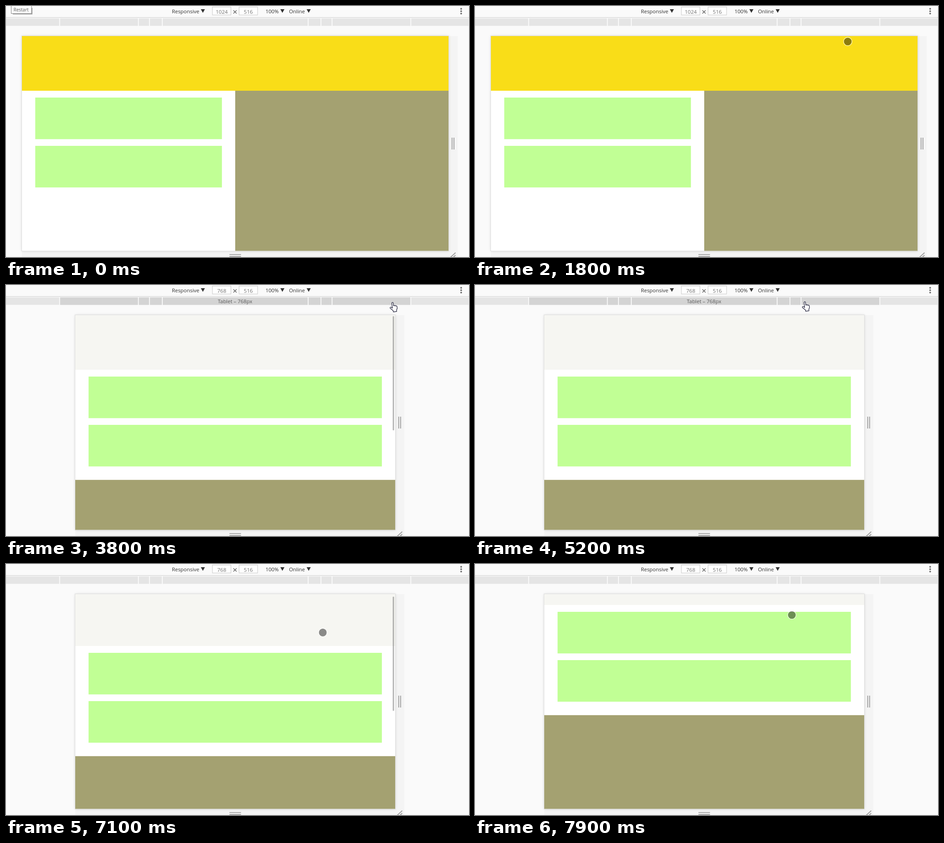
Animation of 1016 by 551 pixels, one loop 8000 ms. Source, as an HTML page:

```html
<!DOCTYPE html>
<html lang="en">
<head>
<meta charset="utf-8">
<title>Responsive preview</title>
<style>
html, body { margin: 0; width: 100%; height: 100%; overflow: hidden; background: #fafafa; }
svg { display: block; width: 1016px; height: 551px; }
text { font: 11.4px "Open Sans", "Noto Sans", sans-serif; fill: #333; }
.mid { text-anchor: middle; }
.size { font-size: 11.6px; fill: #717171; }
</style>
</head>
<body>
<svg viewBox="0 0 1016 551">
  <defs>
    <filter id="soft" x="-5%" y="-5%" width="110%" height="110%"><feGaussianBlur stdDeviation="3"/></filter>
    <clipPath id="screen"><rect id="clip" y="66" height="471.5"/></clipPath>
  </defs>
  <rect width="1016" height="551" fill="#fafafa"/>

  <g id="toolbar">
    <rect y="24.7" width="1016" height="1" fill="#c9c9c9"/>
    <text x="364" y="16.4">Responsive</text>
    <text x="569.5" y="16.4">100%</text>
    <text x="621" y="16.4">Online</text>
    <path d="M427.5 7h9l-4.5 8zM602 7h9l-4.5 8zM659.7 7h9l-4.5 8z" fill="#333"/>
    <g fill="#fff" stroke="#c8c8c8">
      <rect x="453" y="2.3" width="40.5" height="17.5"/>
      <rect x="511.5" y="2.3" width="40.5" height="17.5"/>
    </g>
    <text id="width" class="mid size" x="473.4" y="16.6"></text>
    <text class="mid size" x="531.7" y="16.6">516</text>
    <path d="M499 9.5l7 7m0-7l-7 7" stroke="#555" stroke-width="1.1"/>
    <path d="M998.8 6.2v11" stroke="#6e6e6e" stroke-width="3.8" stroke-linecap="round" stroke-dasharray="0 5.2"/>
  </g>

  <g id="bar">
    <rect y="27.3" width="1015" height="16.3" fill="#e5e5e5"/>
    <rect id="hover" y="27.3" height="16.3" fill="#d4d4d4"/>
    <path id="ticks" stroke="#fcfcfc" stroke-width="1.8"/>
    <text id="label" class="mid" x="502.6" y="40" style="fill:#5a5a5a"></text>
  </g>

  <rect id="strips" y="66" height="485" fill="#f4f4f4"/>
  <rect id="shadow" y="66" height="471.5" opacity=".14" filter="url(#soft)"/>
  <rect id="frame" y="65.5" height="472.5" fill="#fff" stroke="#dedede"/>
  <g clip-path="url(#screen)">
    <g id="page">
      <rect id="head" y="66" height="120"/>
      <rect id="side" height="600" fill="#a4a171"/>
      <rect id="box1" y="201" height="91.3" fill="#c1ff95"/>
      <rect id="box2" y="307" height="91.3" fill="#c1ff95"/>
    </g>
    <rect id="thumb" x="848.6" width="3" height="250.5" rx="1" fill="#808080"/>
  </g>
  <g stroke="#9c9c9c" stroke-width="1.8" fill="none">
    <path d="M490.3 545.6h25.4M490.3 549.8h25.4"/>
    <path id="grips" d="M7.8 289v26M12 289v26M4 552l11.5 -10.5M10 552l5.5 -5"/>
  </g>

  <g id="tip">
    <path d="M15 16.5v2h43V4h-2v12.5z" fill="#777" opacity=".65"/>
    <rect x="11.5" y="-4" width="44.5" height="20.5" fill="#fff" stroke="#858585"/>
    <text x="16.5" y="11.8" style="font-size:10px;fill:#575757">Restart</text>
  </g>

  <g id="touch">
    <circle r="8.6" opacity=".44"/>
    <circle r="9.3" fill="none" stroke="#fff" stroke-width="1.5" opacity=".6"/>
  </g>
  <g id="arrow">
    <path d="M.5 .5V15.3L4 12l2.4 5.4 2-.9-2.3-5.3H10.8z" fill="#fff" stroke="#222" stroke-width=".9"/>
  </g>
  <g id="hand">
    <path transform="translate(-.6) rotate(-7)" d="M-1.1 1.9a1.6 1.6 0 0 1 3.2 0V8a1.5 1.4 0 0 1 2.8 .5a1.4 1.4 0 0 1 2.5 .7a1.3 1.3 0 0 1 2 1.1V14.6L7.4 18V21.2H0V18.4L-5.7 12.6C-7 10.4 -4.6 9.3 -3.2 10.7L-1.1 12.8z" fill="#fff" stroke="#1c1c36" stroke-width="1.2" stroke-linejoin="round"/>
  </g>
</svg>
<script>
const LOOP = 8000, STEP = 100, CENTER = 503;
const $ = id => document.getElementById(id);

// pointer moves: start, end, x, y
const START = [11, -20];
const MOVES = [
  [500, 1000, 323, 123],
  [1300, 1500, 743.5, 115.5],
  [1700, 1800, 818, 78],
  [1800, 2000, 925, 47],
  [2100, 3100, 848, 38],
  [4300, 4800, 767, 36.5],
  [5000, 5400, 709, 36.5],
  [6300, 6600, 696, 207],
  [7000, 7300, 694.5, 105],
  [7600, 7900, 695.3, 112]
];

const ramp = (t, a, b) => Math.min(1, Math.max(0, (t - a) / (b - a)));
const easeOut = u => u * (2 - u);

function pointer(t) {
  let [x, y] = START;
  for (const [from, to, nx, ny] of MOVES) {
    const u = easeOut(ramp(t, from, to));
    x += (nx - x) * u;
    y += (ny - y) * u;
  }
  return [x, y];
}

function set(id, attrs) {
  for (const k in attrs) $(id).setAttribute(k, attrs[k]);
}

const span = (id, x, width) => set(id, { x, width });
const show = (id, on) => set(id, { display: on ? "inline" : "none" });

function drawDevice(wide, half, scroll) {
  const left = CENTER - half, size = 2 * half;
  for (const id of ["clip", "shadow", "head"]) span(id, left, size);
  span("frame", left - .5, size + 1);
  span("strips", left, size + 20);
  for (const id of ["box1", "box2"]) span(id, left + 29.2, (wide ? half : size) - 58.4);
  span("side", wide ? CENTER : left, wide ? half : size);
  set("side", { y: wide ? 186 : 427.8 });
  set("head", { fill: wide ? "#f9dd18" : "#f6f6f2" });
  set("page", { transform: `translate(0 ${-scroll})` });
  set("grips", { transform: `translate(${left + size} 0)` });
  $("width").textContent = wide ? "1024" : "768";
}

function drawHover(hot, offset) {
  const mobile = offset < 212, half = mobile ? 212.5 : 385.3;
  show("hover", hot);
  span("hover", CENTER - half, 2 * half);
  $("label").textContent = !hot ? "" : mobile ? "Mobile L – 425px" : "Tablet – 768px";
}

function render(t) {
  const wide = t < 3800, half = wide ? 468 : 351;
  const scroll = Math.round(96 * ramp(t, 7090, 7260));
  const [x, y] = pointer(t);
  const offset = Math.abs(x - CENTER);
  const hot = y > 27 && y < 44 && offset < 385;
  const inside = y >= 66 && offset < half;

  drawDevice(wide, half, scroll);
  drawHover(hot, offset);
  show("tip", t < 600);
  show("touch", inside);
  show("hand", hot);
  show("arrow", !inside && !hot);
  for (const id of ["touch", "hand", "arrow"]) set(id, { transform: `translate(${x} ${y})` });

  const fade = 1 - ramp(t, 4000, 4200) + ramp(t, 7000, 7100) - ramp(t, 7600, 7900);
  set("thumb", { y: 68.6 + scroll * .52, opacity: wide ? 0 : .58 * fade });
}

set("ticks", {
  d: [160, 188.2, 212.5, 385.3].map(w => `M${CENTER - w} 27v17M${CENTER + w} 27v17`).join("")
});

let start;
function tick(now) {
  start ??= now;
  render(Math.floor((now - start) % LOOP / STEP) * STEP);
  requestAnimationFrame(tick);
}
render(0);
requestAnimationFrame(tick);
</script>
</body>
</html>
```
